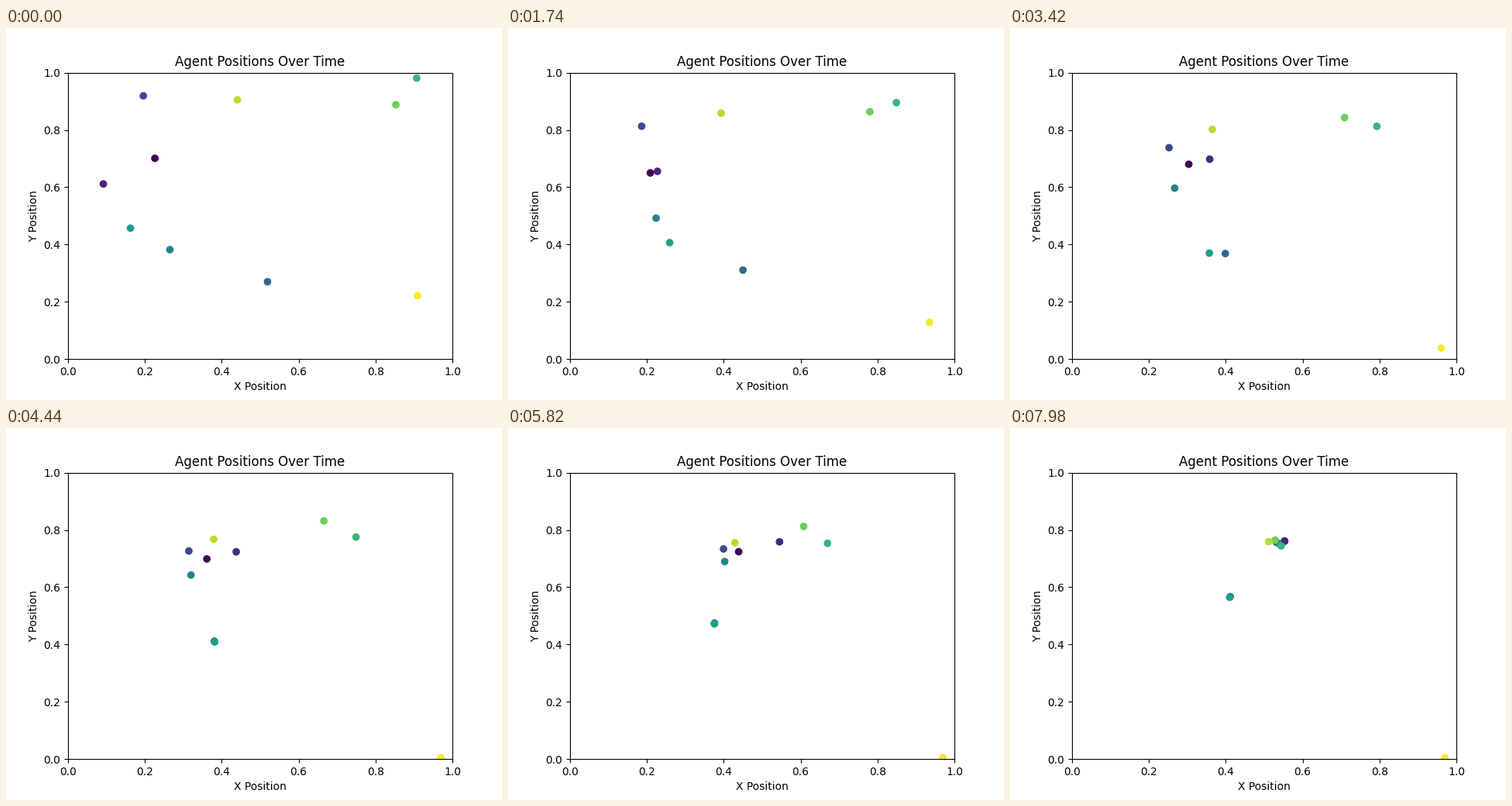
A matplotlib script for the animation above (8 s loop, 640 by 480 pixels).

```python
import numpy as np
import matplotlib.pyplot as plt
from matplotlib.animation import FuncAnimation

TICK = 20        # ms per drawn frame
HOLD = 3         # drawn frames per simulation step
FRAMES = 400
STEPS = (FRAMES - 1) // HOLD + 1

# start x, start y, speed per step, aim (an agent to follow or a fixed point)
AGENTS = [
    (0.226, 0.701, 0.00355, 1),
    (0.092, 0.6115, 0.00491, (0.553, 0.761)),
    (0.196, 0.919, 0.00372, 1),
    (0.519, 0.270, 0.00277, 4),
    (0.265, 0.382, 0.00413, 1),
    (0.1625, 0.457, 0.00376, 3),
    (0.907, 0.981, 0.00357, (0.771, 0.780)),
    (0.853, 0.888, 0.00265, 0),
    (0.4405, 0.905, 0.00229, 1),
    (0.909, 0.2215, 0.00334, (0.970, 0.005)),
]
# step -> agent and the leader it turns to
TURNS = {45: (7, 2), 68: (6, 4)}


def advance(pos, aims):
    """Move every agent one step straight at its aim, stopping on it."""
    goal = np.array([pos[a] if isinstance(a, int) else a for a in aims])
    gap = goal - pos
    dist = np.maximum(np.hypot(gap[:, 0], gap[:, 1]), 1e-9)
    return pos + gap * np.minimum(1, speeds / dist)[:, None]


def simulate():
    pos = np.array([(x, y) for x, y, _, _ in AGENTS])
    aims = [aim for _, _, _, aim in AGENTS]
    path = [pos]
    for step in range(1, STEPS):
        if step in TURNS:
            agent, leader = TURNS[step]
            aims[agent] = leader
        path.append(advance(path[-1], aims))
    return path


speeds = np.array([speed for _, _, speed, _ in AGENTS])
path = simulate()

fig, ax = plt.subplots(figsize=(6.4, 4.8), dpi=100)
ax.set_xlim(0, 1)
ax.set_ylim(0, 1)
ax.set_title("Agent Positions Over Time")
ax.set_xlabel("X Position")
ax.set_ylabel("Y Position")
dots = ax.scatter(*path[0].T, c=np.arange(len(AGENTS)), cmap="viridis")


def update(frame):
    dots.set_offsets(path[frame // HOLD])
    return (dots,)


anim = FuncAnimation(fig, update, frames=FRAMES, interval=TICK,
                     repeat=True, repeat_delay=0, blit=False)
plt.show()
```
